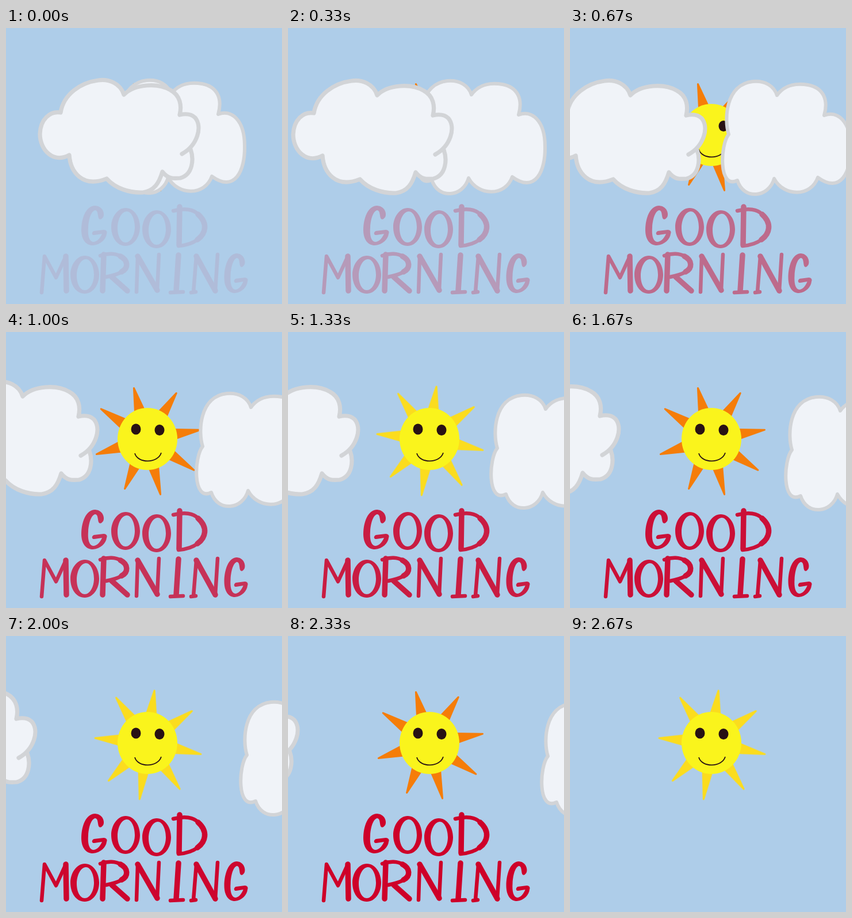
Write an HTML page that moves like this. It is 480 px wide and 480 px high and loops after 3010 ms.

```html
<!DOCTYPE html>
<html lang="en">
<head>
<meta charset="utf-8">
<title>Good morning</title>
<style>
  html, body { margin: 0; width: 100%; height: 100%; overflow: hidden; background: #aecde9; }
  svg { display: block; width: 100%; height: 100%; }

  /* Nine held poses per loop */
  .anim { animation: 3010ms step-end infinite; }
  #left { animation-name: left; }
  #right { animation-name: right; }
  #rays { animation-name: rays; transform-origin: 247px 189px; stroke-width: 3; stroke-linejoin: round; }
  #words { animation-name: words; fill: #ce0029; stroke: #ce0029; stroke-linecap: round; stroke-linejoin: round; }
  .shape { stroke: none; fill-rule: evenodd; }
  .thick { fill: none; stroke-width: 9.5; }
  .thin { fill: none; stroke-width: 6.5; }
  .cloud { fill: #f0f3f8; stroke: #d2d4d7; stroke-linecap: round; stroke-linejoin: round; }

  @keyframes left {
    0% { transform: translate(0, 0); }
    10.963% { transform: translate(-50px, 1px); }
    22.259% { transform: translate(-100px, 1px); }
    33.223% { transform: translate(-176px, -4px); }
    44.186% { transform: translate(-213px, -4px); }
    55.482% { transform: translate(-250px, -5px); }
    66.445% { transform: translate(-284px, -7px); }
    77.409% { transform: translate(-318px, -10px); }
    88.704%, 100% { transform: translate(-350px, -12px); }
  }
  @keyframes right {
    0% { transform: translate(-73px, -2px); }
    10.963% { transform: translate(-41px, -1px); }
    22.259% { transform: translate(0, 0); }
    33.223% { transform: translate(66px, 14px); }
    44.186% { transform: translate(88px, 17px); }
    55.482% { transform: translate(110px, 20px); }
    66.445% { transform: translate(143px, 22px); }
    77.409% { transform: translate(176px, 24px); }
    88.704%, 100% { transform: translate(220px, 26px); }
  }
  @keyframes rays {
    0%, 55.482%, 77.409% { transform: rotate(0deg); fill: #f57d09; stroke: #f57d09; }
    44.186%, 66.445%, 88.704%, 100% { transform: rotate(21.8deg); fill: #fbdc1e; stroke: #fbdc1e; }
  }
  @keyframes words {
    0% { opacity: .08; }
    10.963% { opacity: .25; }
    22.259% { opacity: .48; }
    33.223% { opacity: .76; }
    44.186% { opacity: .87; }
    55.482% { opacity: .93; }
    66.445% { opacity: .98; }
    77.409% { opacity: 1; }
    88.704%, 100% { opacity: 0; }
  }
</style>
</head>
<body>
<svg viewBox="0 0 480 480">
  <defs>
    <path id="g" d="M167 331C173 328 171 310 155 309C139 309 131 331 131 351C131 368 139 378 151 378
      C165 377 174 367 175 358C177 354 174 351 170 351L153 353C148 355 149 361 154 360L167 358
      C163 367 157 372 152 372C144 371 142 360 143 347C144 330 149 318 155 317
      C161 317 159 329 162 332C163 333 166 333 167 331Z"/>
    <path id="o" d="M0-33C15-33 25-17 25 0C25 18 14 33 0 33C-15 33-25 18-25 0C-25-17-14-33 0-33Z
      M2-27C-7-27-14-13-14 2C-14 16-8 27 0 27C9 27 16 14 16 0C16-14 10-27 2-27Z"/>
  </defs>

  <g id="sun">
    <path id="rays" class="anim" d="M224.6 141L222.4 97.5L241 136.8Z
      M263.6 140.7L296.2 106.3L277.8 149.9Z
      M290.5 169.4L338.5 170.2L293.3 186.2Z
      M289.2 204.9L326.8 240.2L279.8 219.1Z
      M264.3 230L268.6 282.5L247.9 234.2Z
      M233.1 232.9L206.6 272.6L217.5 226.1Z
      M201.2 207.9L157.4 212.6L196.2 191.7Z
      M199.7 166.4L165.3 133.8L208.9 152.2Z"/>
    <ellipse cx="246" cy="186" rx="52" ry="54" fill="#faf41c"/>
    <g fill="#281214">
      <ellipse cx="226" cy="169" rx="8.5" ry="9.6"/>
      <ellipse cx="267" cy="170.5" rx="8.5" ry="9.6"/>
    </g>
    <path d="M224 211C229 229 264 229 270 210" fill="none" stroke="#281214" stroke-width="1.8"/>
  </g>

  <path id="right" class="cloud anim" stroke-width="6" d="M276 185
    C268 160 270 98 318 93C339 91 355 101 360 117
    C374 97 397 96 414 99C440 104 450 124 442 152
    C465 143 488 162 488 207C489 250 471 289 431 260
    C419 294 372 294 355 262C346 295 302 300 291 265
    C258 282 261 203 276 185Z"/>

  <path id="left" class="cloud anim" stroke-width="7.2" d="M306 219
    C333 204 342 172 329 156C322 149 311 149 302 151
    C306 135 303 117 286 108C264 95 224 97 205 116
    C199 96 178 88 160 91C130 95 100 115 95 147
    C76 144 60 159 59 184C59 212 82 236 110 221
    C112 250 133 279 175 262C190 279 215 287 238 286
    C258 283 266 270 272 250C282 263 292 262 303 261
    C325 255 327 228 321 211"/>

  <g id="words" class="anim" role="img" aria-label="Good morning">
    <g class="shape">
      <use href="#g"/>
      <use href="#o" x="208" y="346"/>
      <use href="#o" x="262" y="350"/>
      <use href="#o" x="137" y="429"/>
      <use href="#g" transform="translate(259 83) scale(.92 1)"/>
    </g>
    <g class="thick">
      <path d="M302 311L301 377M334 324C352 340 347 358 333 368"/>
      <path d="M104 397L105 457"/>
      <path d="M170 394L168 457M199 397C213 404 213 418 201 424M184 433L211 457"/>
      <path d="M229 397L263 456"/>
      <path d="M300 395L296 457"/>
      <path d="M331 397L364 457"/>
    </g>
    <g class="thin">
      <path d="M291 318C310 313 326 315 334 324M333 368C324 375 313 378 300 379"/>
      <path d="M62 460L67 397L87 434L104 397"/>
      <path d="M164 396C178 391 191 392 199 397M201 424C194 429 184 431 174 433"/>
      <path d="M227 459L229 397M263 456L266 394"/>
      <path d="M286 460L308 459"/>
      <path d="M326 459L331 397M364 457L368 394M322 460L330 459"/>
    </g>
  </g>
</svg>
</body>
</html>
```
